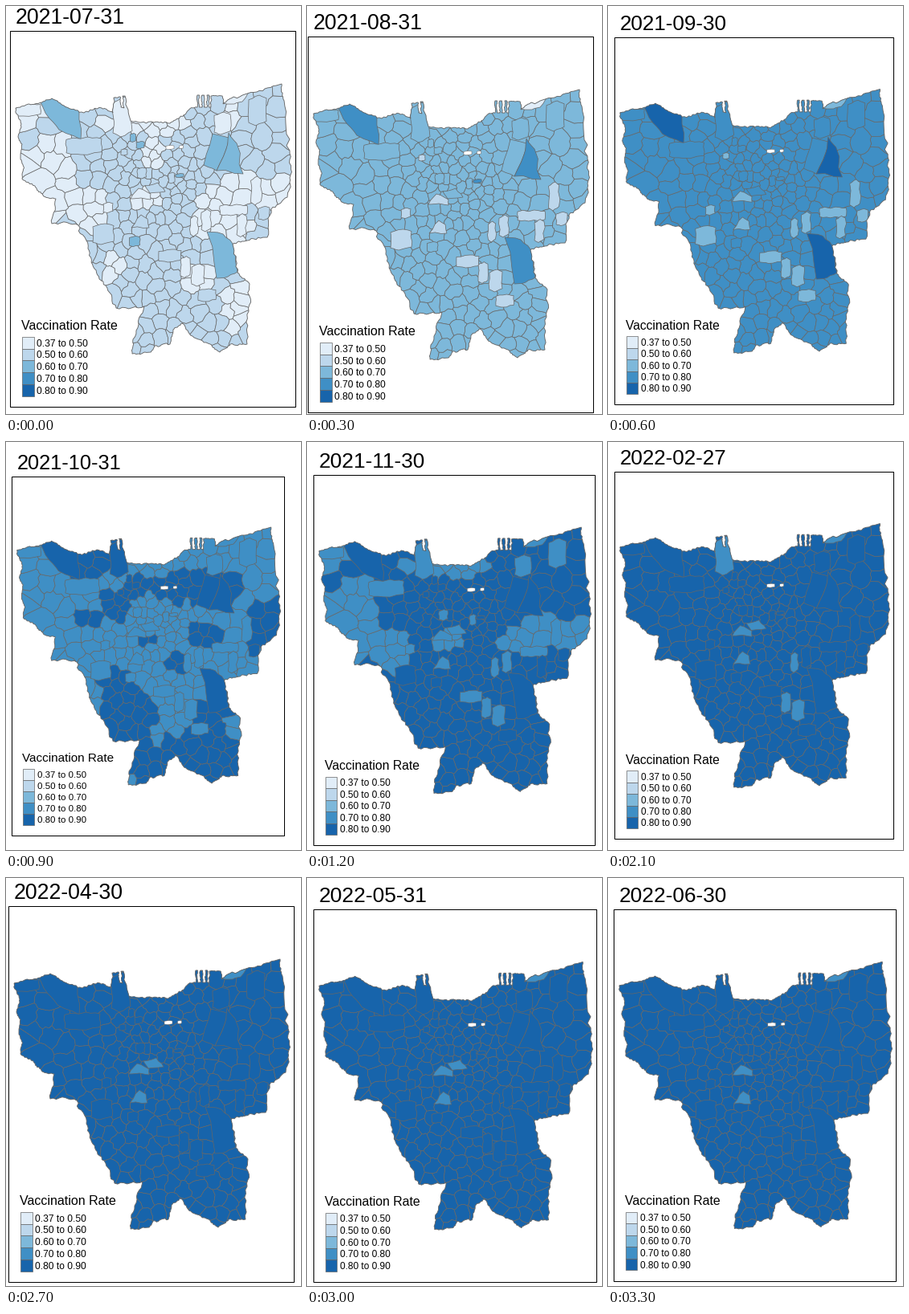
A matplotlib script for the animation above (3.6 s loop, 367 by 508 pixels).

```python
import math
import random

import matplotlib.pyplot as plt
import numpy as np
from matplotlib.animation import FuncAnimation
from matplotlib.collections import PolyCollection
from matplotlib.patches import PathPatch, Polygon, Rectangle
from matplotlib.path import Path

W, H, DPI = 367, 508, 64
PX = 72 / DPI
FONT = "Liberation Sans"
BLUES = ["#e1edf8", "#bdd7ec", "#7db8da", "#3f8fc5", "#1764ab"]
BORDER = "#666666"

# City limits, clockwise from the north-west tip.
coast = [
    (12, 127), (28, 122), (41, 121), (57, 115), (72, 124), (94, 132), (119, 127),
    (133, 133), (134, 114), (142, 113), (143, 126), (147, 127), (145, 112),
    (148, 112), (155, 143), (184, 145), (204, 146), (216, 139), (230, 127)]
piers = [(x + dx, y) for x in (238, 244, 250)
         for dx, y in ((0, 126), (0, 111), (2.5, 111), (2.5, 126))]
east = [
    (255, 126), (255, 112), (269, 112), (270, 122), (280, 115), (312, 107),
    (343, 97), (346, 118), (353, 180), (353, 214), (350, 238), (330, 253),
    (325, 288), (300, 292), (282, 297), (288, 332), (303, 346), (302, 380),
    (300, 421)]
south = [
    (279, 421), (266, 431), (254, 421), (232, 411), (219, 395), (208, 403),
    (204, 421), (185, 423), (180, 431), (157, 433), (158, 415), (170, 382),
    (172, 374), (137, 376)]
west = [
    (124, 348), (110, 327), (102, 302), (90, 273), (57, 271), (62, 240),
    (47, 237), (37, 226), (20, 215), (22, 200), (18, 190), (20, 172), (15, 163),
    (19, 147)]

# Districts with a shape of their own.
cells = {
    "nw": [(42, 118), (57, 112), (91, 129), (93, 166), (66, 154), (54, 140)],
    "wing": [(257, 159), (277, 164), (274, 178), (262, 205), (246, 198)],
    "tri": [(277, 158), (287, 171), (295, 209), (262, 205), (274, 178)],
    "base": [(250, 281), (270, 284), (282, 296), (288, 331), (276, 337),
             (262, 339)],
    "shore": [(270, 121), (280, 112), (305, 105), (294, 119), (284, 122)],
    "fold": [(155, 240), (165, 227), (180, 234), (180, 241), (168, 239)],
    "lid": [(173, 224), (189, 220), (198, 231), (179, 233)],
    "wedge": [(156, 276), (168, 260), (176, 265), (178, 276)],
}


def block(cx, cy, w, h):
    """Six-sided plot of the given centre, width and height."""
    sides = ((-0.5, -0.35), (0.1, -0.5), (0.5, -0.4))
    half = [(cx + u * w, cy + v * h) for u, v in sides]
    return half + [(2 * cx - x, 2 * cy - y) for x, y in half]


cells.update(
    spike=block(145, 138, 24, 50), corner=block(25, 129, 36, 16),
    step=block(97, 174, 44, 22), kink=block(169, 208, 11, 14),
    slip=block(206, 214, 8, 14), bead=block(158, 164, 7, 11),
    bead2=block(167, 173, 10, 9), bar=block(216, 211, 10, 5),
    knot=block(160, 293, 13, 13), chip=block(147, 182, 8, 8),
    chip2=block(127, 251, 12, 13), boot=block(121, 284, 26, 26),
    tower=block(311, 230, 13, 36), strip=block(283, 254, 34, 14),
    leg=block(293, 273, 12, 29), tail=block(321, 258, 14, 17),
    post=block(249, 267, 12, 28), post2=block(234, 274, 9, 26),
    hook=block(204, 311, 28, 16), blob=block(223, 325, 12, 27),
    blob2=block(239, 335, 16, 28), toe=block(250, 360, 22, 16),
    pier=block(269, 146, 20, 28), dock=block(313, 130, 22, 38))

# Oval zones (x, y, rx, ry); a district belongs to one by its centre.
pale = [
    (32, 136, 20, 16), (52, 200, 38, 38), (98, 253, 42, 22), (170, 148, 55, 16),
    (281, 132, 16, 24), (300, 234, 60, 20), (268, 270, 36, 20),
    (288, 372, 18, 32), (175, 241, 26, 12), (238, 335, 22, 24),
    (134, 330, 16, 18), (183, 180, 17, 18)]
dark = [
    (108, 143, 42, 22), (103, 212, 14, 20), (140, 198, 18, 26),
    (165, 175, 17, 15), (245, 175, 55, 22), (285, 200, 18, 20),
    (252, 235, 20, 18), (335, 228, 22, 40), (221, 270, 10, 22),
    (178, 244, 14, 9), (268, 340, 20, 22), (140, 332, 36, 46),
    (182, 360, 18, 40), (235, 402, 85, 40)]
gaps = [(291, 357, 13, 14), (199, 361, 8, 17), (110, 324, 14, 20)]
shelf = [(185, 152, 42, 15)]
lakes = [block(204, 176, 10, 5), block(218, 175.5, 5, 4)]


def wiggle(points, amount):
    """Bend every edge; both neighbours of an edge get the same bend."""
    out = []
    for p, q in zip(points, points[1:] + points[:1]):
        a, b = sorted((p, q))
        dx, dy = b[0] - a[0], b[1] - a[1]
        bends = []
        for t in (0.33, 0.67):
            key = a[0] * 1.9 + a[1] * 7.2 + b[0] * 3.7 + b[1] * 5.3 + t
            k = (math.sin(key) * 437.58 % 1 - 0.5) * amount
            bends.append((a[0] + dx * t - dy * k, a[1] + dy * t + dx * k))
        out.append(p)
        out += bends if a == p else bends[::-1]
    return out


def inside(poly, points):
    return Path(poly + poly[:1]).contains_points(points)


def spacing(x, y):
    d = math.hypot(x - 192, (y - 205) / 1.15)
    r = 8.4 + 9.5 * min(1, max(0, d - 25) / 105)
    return min(r, 13.2) if y > 270 else r


def scatter(border):
    rng = random.Random(7)
    tries = [(rng.uniform(8, 356), rng.uniform(95, 436)) for _ in range(9000)]
    free = inside(border, tries)
    for poly in cells.values():
        free &= ~inside(poly, tries)
    kept = []
    for (x, y), ok in zip(tries, free):
        r = spacing(x, y)
        if ok and all((x - u) ** 2 + (y - v) ** 2 > r * r for u, v in kept):
            kept.append((x, y))
    return kept


def cut(poly, mid, normal):
    def side(p):
        return (p[0] - mid[0]) * normal[0] + (p[1] - mid[1]) * normal[1]

    out = []
    for p, q in zip(poly, poly[1:] + poly[:1]):
        a, b = side(p), side(q)
        if a <= 0:
            out.append(p)
        if a * b < 0:
            t = a / (a - b)
            out.append((p[0] + (q[0] - p[0]) * t, p[1] + (q[1] - p[1]) * t))
    return out


def voronoi(sites):
    pts = np.array(sites)
    polys = []
    for x, y in sites:
        near = np.argsort(np.hypot(pts[:, 0] - x, pts[:, 1] - y))[1:41]
        poly = [(0, 80), (W, 80), (W, 450), (0, 450)]
        for u, v in pts[near]:
            poly = cut(poly, ((x + u) / 2, (y + v) / 2), (u - x, v - y))
        polys.append(poly)
    return polys


border = coast + piers + east + south + west
sites = scatter(border)
shapes = [wiggle(p, 0.3) for p in voronoi(sites)]
index = {name: len(sites) + i for i, name in enumerate(cells)}
shapes += [wiggle(p, 0.12) for p in cells.values()]
centres = np.array(sites + [tuple(np.mean(p, axis=0)) for p in cells.values()])

low = ("shore chip fold wedge chip2 boot tower strip leg tail post post2 "
       "hook blob blob2 toe").split()
late = ("corner spike step kink slip fold lid wedge tower strip post post2 "
        "shore pier dock hook blob blob2").split()
few = "shore spike fold lid wedge post2 blob blob2".split()
last = "shore fold lid wedge".split()
big = ["nw", "tri", "base"]

# date, box left, box top, box width, main class, (class, areas) in order
MONTHS = [
    ("2021-07-31", 5, 31, 355, 1,
     [(0, pale), (2, big + ["wing", "bead", "bead2", "bar", "knot"])]),
    ("2021-08-31", 1, 38, 355, 2, [(1, low), (0, ["shore"]), (3, big + ["bar"])]),
    ("2021-09-30", 8, 39, 347, 3, [(2, low), (4, big)]),
    ("2021-10-31", 7, 43, 339, 3, [(4, dark + big + ["wing"]), (3, gaps)]),
    ("2021-11-30", 8, 41, 350, 4, [(3, pale[:4] + pale[5:9:3] + late), (4, big)]),
    ("2021-12-31", 6, 38, 350, 4, [(3, shelf + late)]),
    ("2022-01-31", 9, 35, 350, 4, [(3, few + ["hook", "tower", "dock"])]),
    ("2022-02-27", 8, 37, 347, 4, [(3, few)]),
    ("2022-03-31", 6, 40, 350, 4, [(3, last + ["blob2"])]),
    ("2022-04-30", 3, 35, 355, 4, [(3, last)]),
    ("2022-05-31", 8, 39, 352, 4, [(3, last)]),
    ("2022-06-30", 7, 39, 351, 4, [(3, ["shore", "fold", "wedge"])]),
]


def classes(main, rules):
    level = np.full(len(shapes), main)
    for value, areas in rules:
        for area in areas:
            if isinstance(area, str):
                level[index[area]] = value
            else:
                x, y, rx, ry = area
                far = np.hypot((centres[:, 0] - x) / rx, (centres[:, 1] - y) / ry)
                level[far <= 1] = value
    return level


fig = plt.figure(figsize=(W / DPI, H / DPI), dpi=DPI, facecolor="white")
ax = fig.add_axes([0, 0, 1, 1])
ax.axis("off")

ax.add_patch(Rectangle((5, 31), 355, 468, fill=False, ec="black", lw=PX))
shoreline = wiggle(wiggle(border, 0.14), 0.3)
limits = PathPatch(Path(shoreline + shoreline[:1]), fill=False, ec=BORDER,
                   lw=0.9 * PX, zorder=4)
ax.add_patch(limits)
districts = PolyCollection(shapes, edgecolors=BORDER, linewidths=0.7 * PX, zorder=2)
ax.add_collection(districts, autolim=False)
districts.set_clip_path(limits)
for lake in lakes:
    ax.add_patch(Polygon(lake, fc="white", ec=BORDER, lw=0.5 * PX, zorder=5))

texts = []


def label(x, y, text, size):
    t = ax.text(x, y, text, family=FONT, fontsize=size * PX, va="baseline", zorder=6)
    texts.append((t, size))
    return t


title = label(12, 22, "", 26.6)
label(19, 403, "Vaccination Rate", 16)
bounds = ["0.37"] + [f"0.{k}0" for k in range(5, 10)]
for i, color in enumerate(BLUES):
    top = 412 + 14.7 * i
    ax.add_patch(Rectangle((20, top), 14.7, 14.7, fc=color, ec=BORDER,
                           lw=0.7 * PX, zorder=6))
    label(38.5, top + 11.8, f"{bounds[i]} to {bounds[i + 1]}", 12)


def draw(i):
    date, x, y, width, main, rules = MONTHS[i]
    s = width / 355
    ax.set_xlim(5 - x / s, 5 + (W - x) / s)
    ax.set_ylim(31 + (H - y) / s, 31 - y / s)
    title.set_text(date)
    for t, size in texts:
        t.set_fontsize(size * s * PX)
    districts.set_facecolor([BLUES[k] for k in classes(main, rules)])
    return []


anim = FuncAnimation(fig, draw, frames=len(MONTHS), interval=300, repeat=True,
                     repeat_delay=0, blit=False)
plt.show()
```
